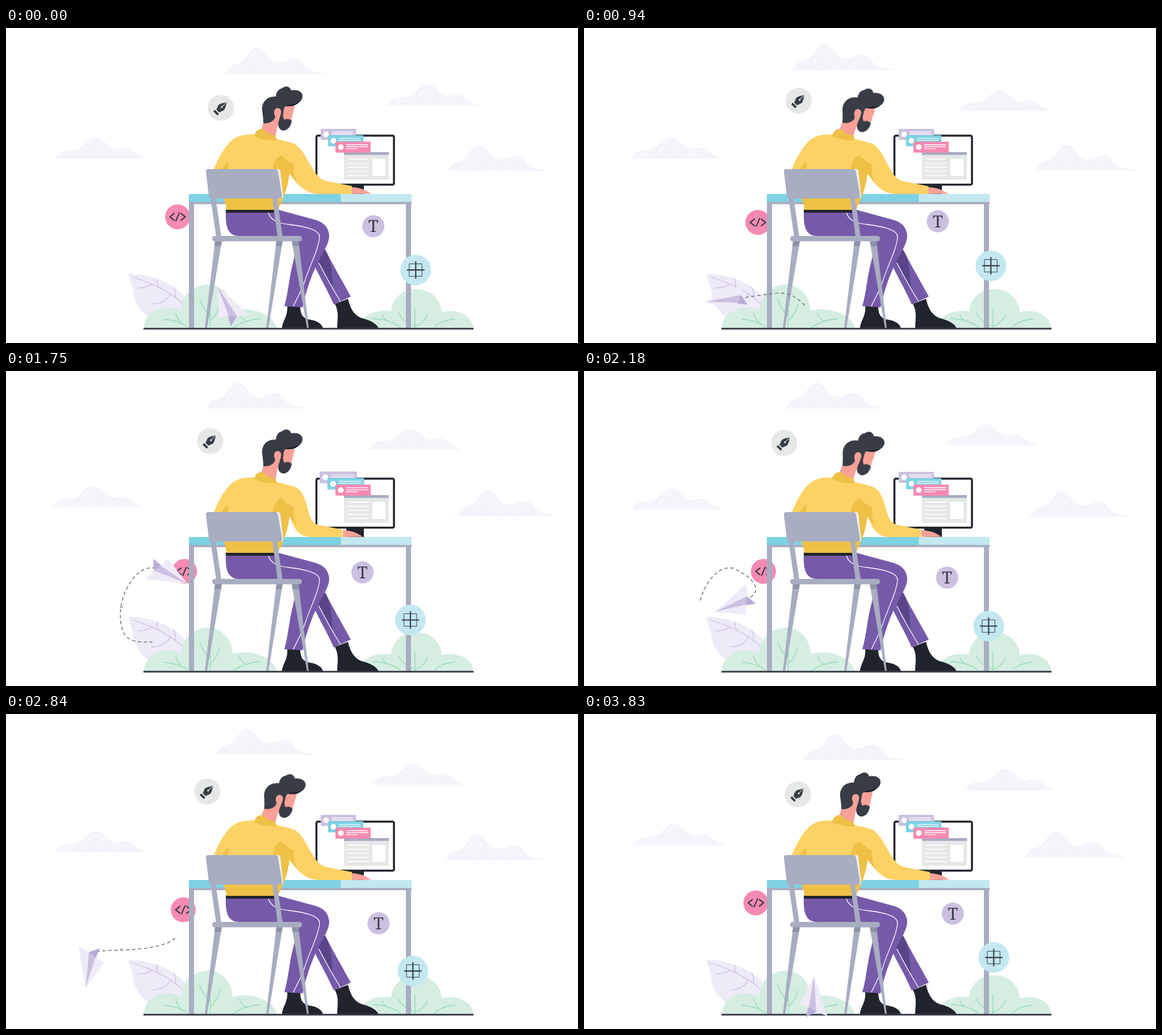
These frames come from a looping animation (1007 by 556 pixels, 3.93 s). An HTML page:

```html
<!DOCTYPE html>
<html lang="en">
<head>
<meta charset="utf-8">
<title>Designer at work</title>
<style>
  html, body { margin: 0; width: 100%; height: 100%; overflow: hidden; background: #fff; }
  svg { display: block; width: 100%; height: 100%; }
  .ink { fill: #383c45; }
  .black { fill: #20242c; }
  .steel { fill: #a8adc1; }
  .steel-dark { fill: #8e93a8; }
  .yellow { fill: #fcd265; }
  .mustard { fill: #eec046; }
  .skin { fill: #f8a198; }
  .purple { fill: #765aaa; }
  .plum { fill: #5a4589; }
  .aqua { fill: #7dd2e3; }
  .ice { fill: #c3e8f0; }
  .lilac { fill: #cbc0e0; }
  .mist { fill: #eeeaf7; }
  .pink { fill: #f58ab2; }
  .grey { fill: #e6e8e7; }
  .mint { fill: #d6ede1; }
  .cloud { fill: #f6f4fb; }
  .line { fill: none; stroke-linecap: round; stroke-linejoin: round; }
  .vein { stroke: #8fdcb6; stroke-width: 1.3; }
  .leaf { stroke: #c8bde1; stroke-width: 1.2; }
  .white { stroke: #fff; stroke-width: 1.3; }
  .dark { stroke: #383c45; stroke-width: 2.2; }
  #trail { fill: none; stroke: #777980; stroke-width: 1.6; stroke-dasharray: 6 4.5; }
  #trim { fill: none; stroke: #fff; stroke-width: 6; }
  text { font: 500 29px "Noto Serif", serif; text-anchor: middle; }

  #head, #arm, #hand, .popup { animation: 3930ms ease-in-out infinite; }
  #head { animation-name: nod; transform-origin: 462px 185px; }
  #arm { animation-name: bend; }
  #hand { animation-name: slide; }
  .popup { animation-name: pop; transform-box: fill-box; transform-origin: center; }
  #card3 { animation-delay: 50ms; }
  #card2 { animation-delay: 100ms; }
  #card1 { animation-delay: 150ms; }

  @keyframes nod {
    0%, 43.5%, 45%, 84%, 100% { transform: none; }
    11%, 18%, 55%, 61% { transform: rotate(6.5deg); }
    31.3%, 72.3% { transform: rotate(5deg); }
  }
  @keyframes bend {
    0%, 21.6%, 66%, 100% { d: path("M504 203C519 208 527 227 536 242C546 258 551 268 568 271L609 279V293H552C530 293 516 281 499 257L488 225Z"); }
    30.5%, 53% { d: path("M504 203C522 207 527 226 531 243C535 259 539 270 552 272L592 280V293H537C518 293 507 281 500 257L488 225Z"); }
  }
  @keyframes slide {
    0%, 21.6%, 66%, 100% { transform: none; }
    30.5%, 53% { transform: translateX(-15px); }
  }
  @keyframes pop {
    0% { transform: none; }
    28.7% { transform: none; animation-timing-function: ease-in; }
    33.8%, 35.6% { transform: scale(0); animation-timing-function: ease-out; }
    40.7% { transform: scale(1.06); }
    44%, 100% { transform: none; }
  }
</style>
</head>
<body>
<svg viewBox="0 0 1007 556" preserveAspectRatio="none">
  <defs>
    <g id="tall">
      <path class="cloud" d="M0 0C9-4 8-10 14-14 20-19 26-16 33-22 44-30 46-46 59-46 74-46 76-27 89-22 104-17 112-27 125-27 140-28 141-10 156-6 165-4 174-3 182 0Z"/>
      <path class="line white" opacity=".6" d="M38-8Q46-30 60-38M58-6Q60-22 70-32M80-4Q86-14 92-18M108-4Q116-18 128-22"/>
    </g>
    <g id="wide">
      <path class="cloud" d="M0 0C8-4 6-9 14-12 22-16 32-13 42-17 56-23 60-37 74-37 88-37 92-23 104-18 112-15 116-20 126-19 138-19 141-11 148-7 154-4 160-3 165 0Z"/>
      <path class="line white" opacity=".6" d="M20-3Q26-9 34-11M50-4Q58-22 72-30M74-4Q78-18 86-24M104-3Q112-12 124-14"/>
    </g>
    <g id="rows">
      <circle cx="9.5" cy="9.7" r="5" fill="#fff"/>
      <path class="line white" d="M19.5 5.5H57M19.5 9H57M19.5 12.7H38"/>
    </g>
    <mask id="window" maskUnits="userSpaceOnUse" width="1007" height="556"><path id="trim"/></mask>
  </defs>

  <use href="#tall" id="cloudA"/>
  <use href="#wide" id="cloudB"/>
  <use href="#wide" id="cloudC"/>
  <use href="#tall" id="cloudD"/>

  <path class="mist" d="M216 434C252 433 294 450 315 474 328 490 326 502 320 510H250C234 498 226 483 224 466 222 450 216 444 216 434Z"/>
  <path class="line leaf" d="M222 439C258 451 294 466 318 494M269 458Q264 450 267 443M298 476Q300 466 295 457M231 459Q245 459 256 453M257 487Q281 486 289 470"/>
  <path class="mint" d="M243 530C243 506 264 492 289 493 297 494 304 497 309 500 308 474 329 453 355 453 380 453 398 473 399 499 428 491 469 502 477 530Z"/>
  <path class="line vein" d="M359 529Q362 505 356 476M341 478Q346 496 360 507M376 488Q372 506 360 516M278 514Q304 516 320 528M299 503Q300 512 308 519M400 529Q420 515 447 513M411 503Q414 514 424 518"/>
  <path class="mint" d="M621 530C624 508 648 496 678 500 680 476 699 461 722 461 748 461 766 479 767 502 792 494 821 506 823 530Z"/>
  <path class="line vein" d="M720 529V495M691 503Q700 520 720 527M742 506Q737 520 720 527M646 513Q676 514 694 528M662 506Q664 514 674 518M754 528Q768 515 790 514"/>

  <g id="pen">
    <circle class="grey" r="23"/>
    <g transform="rotate(45)">
      <path class="ink" d="M0-14.500C3-9 7-4 6.500 0L3.500 8H-3.500L-6.500 0C-7-4-3-9 0-14.500ZM-5 10H5V14H-5Z"/>
      <path class="line" stroke="#e6e8e7" d="M0-14V-3"/>
      <circle class="grey" cy="-2" r="1.6"/>
    </g>
  </g>
  <g id="code">
    <circle class="pink" r="22"/>
    <path class="line dark" d="M-6-6L-13.500 0-6 6M3-7L-3 7M6-6L13.500 0 6 6"/>
  </g>
  <g id="type">
    <circle class="lilac" r="19.5"/>
    <text class="ink" y="10.5">T</text>
  </g>

  <path class="steel" d="M322 306H714V311H713V530H704V311H331V530H322Z"/>
  <path class="aqua" d="M322 293H590V307H322Z"/>
  <path class="ice" d="M589.500 293H714V307H589.500Z"/>

  <path class="black" d="M599 276H630V293H599Z"/>
  <rect x="546.5" y="190" width="136.5" height="86.5" rx="2.5" fill="#fff" stroke="#20242c" stroke-width="3.5"/>
  <g id="page" class="popup">
    <path class="grey" d="M595 219H674V268H595Z"/>
    <path class="steel" d="M595 219H674V224H595Z"/>
    <path class="line white" d="M601.500 231.500H638M601.500 239H638M601.500 246H638M601.500 253H638M601.500 260.500H638"/>
    <path fill="#fff" d="M645 231H668V261H645Z"/>
  </g>
  <g id="card1" class="popup"><rect class="lilac" x="554" y="178" width="62" height="19.5" rx="1"/><use href="#rows" x="554" y="178"/></g>
  <g id="card2" class="popup"><rect class="aqua" x="567" y="189.3" width="62" height="19.5" rx="1"/><use href="#rows" x="567" y="189.3"/></g>
  <g id="card3" class="popup"><rect class="pink" x="580" y="200.5" width="62" height="19.5" rx="1"/><use href="#rows" x="580" y="200.5"/></g>

  <path class="purple" d="M553 394L562 391C574 416 592 446 607 474L577 488C566 462 549 434 542 417Z"/>
  <path class="plum" d="M552 396L561 391C571 405 574 425 575 458L551 414 546 408Z"/>
  <path class="line white" d="M551 415Q570 452 589 483"/>
  <path class="black" d="M579 487L602 478C606 494 612 507 626 512 641 516 652 521 656 530H583C583 515 587 502 579 487Z"/>
  <path class="black" d="M495 491H518C518 503 521 511 531 514 546 516 556 521 558 530H486C486 518 497 508 495 491Z"/>
  <path class="purple" d="M387 325H466L480 321 546 339C562 344 569 355 569 368 568 384 555 400 546 420 534 446 527 470 522 493L490 491C498 462 498 441 506 411L515 367H410C390 367 386 349 387 325Z"/>
  <path class="line white" d="M462 326C466 340 480 345 500 347 525 350 553 356 552 369 550 392 534 420 525 450 518 468 511 480 506 491"/>
  <path class="black" d="M387 320H472V326H387Z"/>

  <g id="head">
    <path class="skin" d="M449 181L454 164 476 154 484 140 508 135C508 146 503 154 503 164L486 172 478 172 474 195Z"/>
    <path class="ink" d="M484 143C488 150 487 160 491 162 495 159 500 161 503 164 502 173 496 181 488 181 480 180 478 172 480 165 482 158 485 152 484 143Z"/>
    <path class="ink" d="M453 168C453 160 452 153 451 146 449 130 461 120 475 121 476 112 481 107 485 107 491 101 500 102 502 110 511 108 521 111 522 119 523 128 514 134 507 137 500 139 495 136 491 139 488 143 489 150 487 156L482 150 474 156C473 164 464 169 453 168Z"/>
    <path fill="#191c23" d="M491 138C501 134 510 135 516 130 513 135 506 139 491 138Z"/>
    <path class="skin" d="M484 145C481 139 472 140 472 149 472 156 477 161 481 157 484 153 485 149 484 145Z"/>
  </g>
  <path class="yellow" d="M366 249C376 224 392 195 413 190 421 188 430 188 438 188L476 196C490 199 504 202 511 206L510 235 499 257C497 278 489 301 478 321H388C388 311 384 306 383 298Z"/>
  <path class="mustard" d="M437 191C438 183 444 178 451 178 458 184 466 189 474 190L477 198C462 199 448 196 437 191ZM380 249C383 243 388 238 392 236L391 249ZM383 300H486L478 321H388C388 311 384 306 383 300Z"/>
  <path class="skin" id="hand" d="M608 281C622 281 634 286 643 292.500L608 293Z"/>
  <path class="yellow" id="arm"/>
  <path class="mustard" d="M470 249C471 236 477 226 486 225 491 231 499 238 507 240 506 252 508 262 512 273L499 257C497 278 489 301 478 321L472 300Z"/>

  <path fill="#f1eff2" d="M475 249H479Q482 249 483 253L488 296Q488 301 484 301Z"/>
  <path class="steel" d="M360 300H369L379 368H370ZM469 300H477L487 368H478Z"/>
  <path class="steel" d="M352 254Q351 249 357 249H473Q478 249 479 254L486 296Q486 301 482 301H363Q358 301 357 296Z"/>
  <path class="steel" d="M368 376H380L354 530H350ZM476 376H487L462 530H458ZM503 376H515L533 530H530Z"/>
  <path class="steel-dark" d="M368 376H380L378.500 385H367ZM476 376H487L485.500 385H475ZM503 376H515L516 385H505Z"/>
  <rect class="steel" x="363" y="367" width="158" height="9.5" rx="4.5"/>

  <g id="grid">
    <circle class="ice" r="27"/>
    <path class="line" stroke="#383c45" d="M-11-11H11V11H-11Z"/>
    <path class="line dark" d="M0-14.500V14.500M-14.500 0H14.500"/>
  </g>
  <path fill="#383d46" d="M242 529.300H823V532.300H242Z"/>

  <g mask="url(#window)"><path id="trail"/></g>
  <g id="plane">
    <path class="mist" d="M58 0L-12 25-5 5ZM58 0L8-25 2-7Z"/>
    <path class="lilac" d="M58 0L-5 5 1-8Z"/>
    <path fill="#b9add7" d="M-5 5L-15-13 3-9Z"/>
  </g>
</svg>
<script>
const LOOP = 3930;
const $ = id => document.getElementById(id);
const move = (id, value) => $(id).setAttribute("transform", value);

// Each part circles a centre (x, y): centre + u cos + v sin
const orbits = {
  pen: { x: 366.8, y: 132.9, u: [11.6, 8], v: [10.5, -5.2] },
  code: { x: 308.8, y: 343.8, u: [-6.7, -10.5], v: [-2.2, 0] },
  type: { x: 639.8, y: 355.2, u: [6.8, -5.3], v: [-17.4, -13.7] },
  grid: { x: 716.6, y: 436.3, u: [4.7, -9.1], v: [-.6, -16] },
  cloudA: { x: 365.5, y: 73.7, u: [17, 7.7], v: [-2.4, 0] },
  cloudB: { x: 651.6, y: 135.7, u: [16.7, 1.1], v: [5.5, 10.9] },
  cloudC: { x: 82, y: 236.7, u: [2.3, -6.2], v: [-2.8, -6.2] },
  cloudD: { x: 779.4, y: 255, u: [-6.2, -2.3], v: [10.8, -2.8] }
};

function drawOrbits(t) {
  const a = t / LOOP * 2 * Math.PI, c = Math.cos(a), s = Math.sin(a);
  for (const id in orbits) {
    const { x, y, u, v } = orbits[id];
    move(id, `translate(${x + u[0] * c + v[0] * s} ${y + u[1] * c + v[1] * s})`);
  }
}

// The plane's closed route, one curve per leg, and when each leg ends
const legs = [
  "M400 507C392 492 372 465 339 468",
  "C290 473 219 492 207 462",
  "C185 408 231 332 267 350",
  "C302 367 317 391 284 404",
  "C230 425 153 410 150 426",
  "C147 480 205 550 300 550S413 532 400 507"
];
const times = [0, 610, 1230, 1750, 2180, 2840, LOOP];
const TAKEOFF = .1;
const LAG = 750;
const route = $("trail");
const marks = times.map((_, i) => {
  route.setAttribute("d", legs.slice(0, i).join("") || "M400 507");
  return i ? route.getTotalLength() : 0;
});
$("trim").setAttribute("d", legs.join(""));

const speed = i => i % legs.length
  ? (marks[i + 1] - marks[i - 1]) / (times[i + 1] - times[i - 1])
  : TAKEOFF;

// Distance flown by time t, with smooth speed across legs
function flown(t) {
  if (t <= 0) return 0;
  const i = times.findIndex(end => end >= t) - 1;
  const h = times[i + 1] - times[i], k = (t - times[i]) / h;
  const d = marks[i + 1] - marks[i], m = speed(i) * h, n = speed(i + 1) * h;
  return marks[i] + k * (m + k * (3 * d - 2 * m - n + k * (m + n - 2 * d)));
}

function drawPlane(t) {
  const s = flown(t);
  const p = route.getPointAtLength(s);
  const a = route.getPointAtLength(s - 1), b = route.getPointAtLength(s + 1);
  const turn = Math.atan2(b.y - a.y, b.x - a.x) * 180 / Math.PI;
  move("plane", `translate(${p.x} ${p.y}) rotate(${turn})`);
  // The trail follows late and catches up before landing
  const lag = LAG * Math.min(1, Math.max(0, (3700 - t) / 860));
  const from = flown(t - lag);
  $("trim").setAttribute("stroke-dasharray", `0 ${from} ${Math.max(0, s - from)} 9999`);
}

let start;
function tick(now) {
  start ??= now;
  const t = (now - start) % LOOP;
  drawOrbits(t);
  drawPlane(t);
  requestAnimationFrame(tick);
}
requestAnimationFrame(tick);
</script>
</body>
</html>
```
